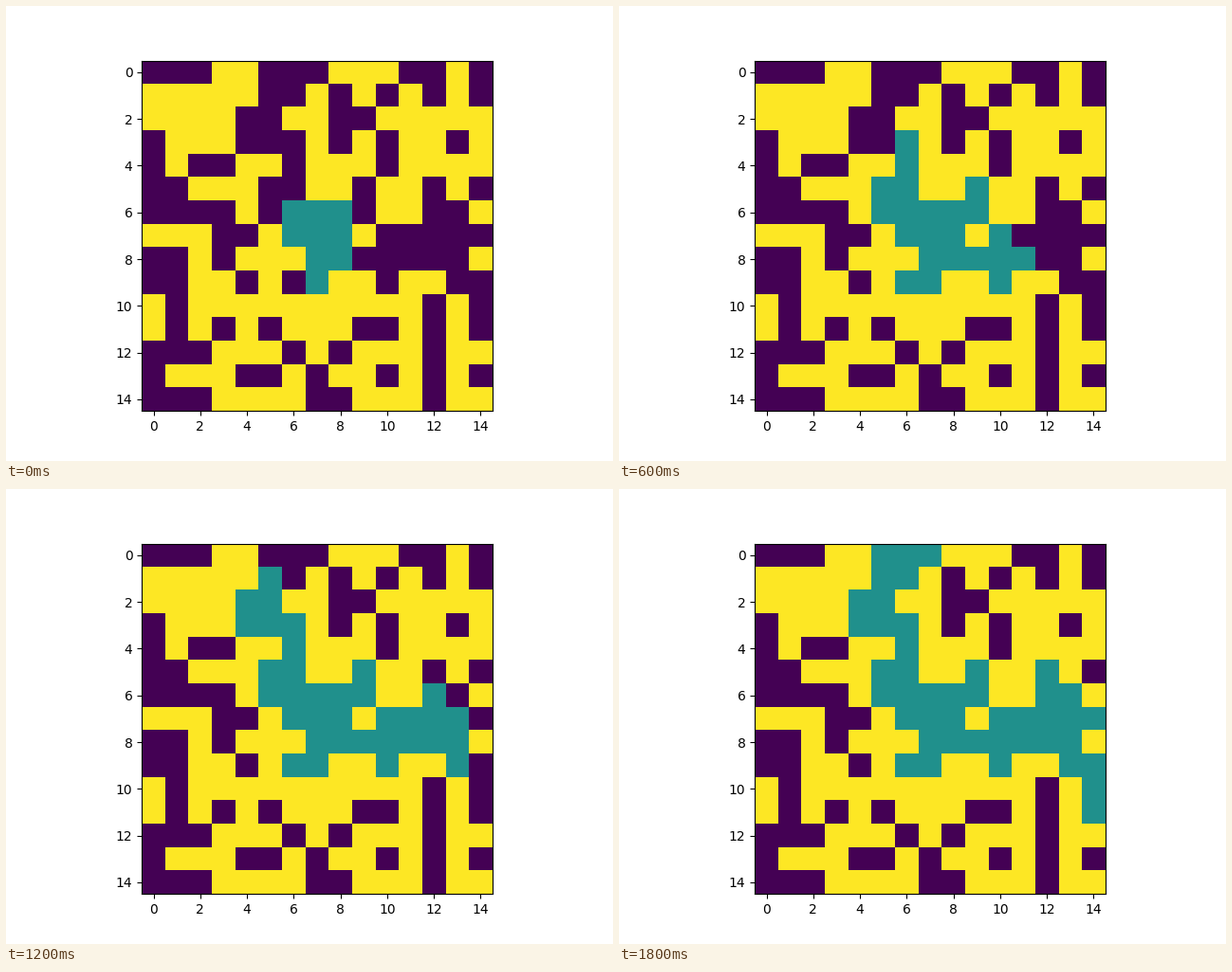
Animation of 640x480 px, one loop 8 s. Source, as a matplotlib script:

```python
import numpy as np
import matplotlib.pyplot as plt
from matplotlib.animation import FuncAnimation

MAZE = """
...##...###..#.
#####..#.#.#.#.
####..##..#####
.###...#.#.##.#
.#..##.###.####
..###..##.##.#.
....#.....##..#
###..#...#.....
..#.###.......#
..##.#..##.##..
#.##########.#.
#.#.#.###..#.#.
...###.#.###.##
.###..#.##.#.#.
...####..###.##
""".split()
START = (7, 7)
FIRST_DEPTH = 2
INTERVAL = 200
FRAMES = 8000 // INTERVAL

walls = np.array([[float(ch == "#") for ch in row] for row in MAZE])


def flood_depths(walls, start):
    """Steps from start to each open cell, inf where it cannot be reached."""
    rows, cols = walls.shape
    depth = np.full(walls.shape, np.inf)
    depth[start] = 0
    front = [start]
    while front:
        reached = []
        for r, c in front:
            for y, x in ((r - 1, c), (r + 1, c), (r, c - 1), (r, c + 1)):
                inside = 0 <= y < rows and 0 <= x < cols
                if inside and not walls[y, x] and np.isinf(depth[y, x]):
                    depth[y, x] = depth[r, c] + 1
                    reached.append((y, x))
        front = reached
    return depth


depth = flood_depths(walls, START)


def grid_at(frame):
    return np.where(depth <= FIRST_DEPTH + frame, 0.5, walls)


fig, ax = plt.subplots(figsize=(6.4, 4.8), dpi=100)
image = ax.imshow(grid_at(0), cmap="viridis", vmin=0, vmax=1)


def update(frame):
    image.set_data(grid_at(frame))
    return [image]


anim = FuncAnimation(fig, update, frames=FRAMES, interval=INTERVAL,
                     repeat=True, repeat_delay=0)
plt.show()
```
